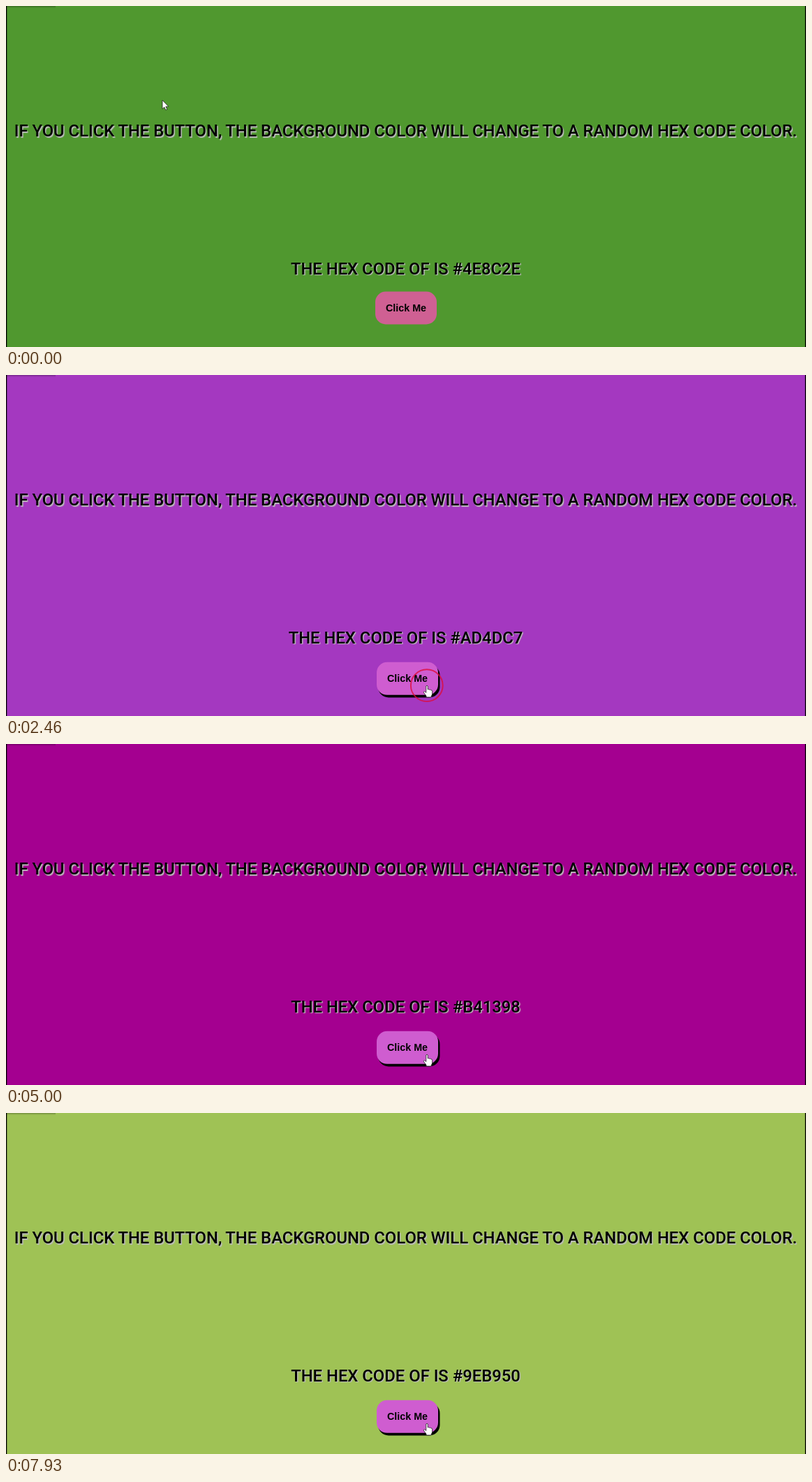
An HTML page that plays this animation: 1146x489 px, repeating every 8000 ms.

```html
<!DOCTYPE html>
<html lang="en">
<head>
<meta charset="utf-8">
<title>Random background color</title>
<style>
html, body { margin: 0; width: 100%; height: 100%; overflow: hidden; }
svg { display: block; width: 100%; height: 100%; }
.line { font: 500 23.8px Roboto, sans-serif; text-anchor: middle; text-shadow: 1.5px 1.5px 1px #bbb; }
.label { font: bold 14.3px "Liberation Sans", sans-serif; text-anchor: middle; }
</style>
</head>
<body>
<svg viewBox="0 0 1146 489">
  <defs>
    <linearGradient id="shade" x1="0" y1="0" x2="0" y2="1">
      <stop offset="0" stop-opacity=".28"/>
      <stop offset="1" stop-opacity="0"/>
    </linearGradient>
  </defs>
  <rect id="page" width="1146" height="489"/>
  <rect width="71" height="3" fill="url(#shade)"/>
  <path d="M.6 0V489M1145.4 0V489" stroke="#000" stroke-width="1.4"/>
  <text class="line" x="572.5" y="187">IF YOU CLICK THE BUTTON, THE BACKGROUND COLOR WILL CHANGE TO A RANDOM HEX CODE COLOR.</text>
  <text class="line" id="code" x="572.5" y="384.5"></text>
  <g id="button">
    <rect id="drop" x="531" y="413.2" width="88.5" height="47" rx="15"/>
    <rect id="face" x="529" y="409.5" width="88" height="47" rx="15"/>
    <text class="label" x="573" y="437.7">Click Me</text>
  </g>
  <circle id="ring" cx="602.8" cy="445.2" fill="none" stroke="#e00b38"/>
  <g id="cursor" stroke="#222" stroke-width=".8" stroke-linejoin="round" fill="#fff">
    <path id="arrow" d="M0 0V12.6L2.8 10L4.8 14.2L6.8 13.3L4.9 9.2H8.8Z"/>
    <path id="hand" d="M-1.2 1Q0-.6 1.2 1V6Q2.6 5 3.4 6.4Q5 5.6 5.8 7Q7.4 6.6 7.6 8.2V12Q7.4 14 6.2 15.5V17H-1V15.3L-4.3 10.8Q-5.3 9-3.5 8.6L-1.2 10.5Z"/>
  </g>
</svg>
<script>
const LOOP = 8000, HOLD = 100, FADE = 370, RADIUS = 25;
const presses = [930, 2330, 3430, 4370, 5370, 6304, 7430];
// start time, shown code, rendered color
const pages = [
  [0, "4E8C2E", "#50982f"],
  [1000, "871CF6", "#7b00ed"],
  [2430, "AD4DC7", "#a438c0"],
  [3530, "B41398", "#a40090"],
  [5470, "E87916", "#de7318"],
  [6404, "80EB2C", "#86ff30"],
  [7530, "9EB950", "#9fc255"]
];
const $ = id => document.getElementById(id);
const set = (id, attrs) => {
  for (const name in attrs) $(id).setAttribute(name, attrs[name]);
};
const clamp = v => Math.min(1, Math.max(0, v));
const ease = v => v * v * (3 - 2 * v);

function drawPage(t) {
  const [, code, color] = pages.findLast(page => t >= page[0]);
  const text = "THE HEX CODE OF IS #" + code;
  set("page", { fill: color });
  if ($("code").textContent !== text) $("code").textContent = text;
}

function drawPointer(t) {
  const p = ease(clamp((t - 60) / 800));
  const x = 224 + 379 * p, y = 135 + 310 * p;
  const over = x > 529 && x < 618 && y > 409;
  set("cursor", { transform: `translate(${x} ${y})` });
  set("arrow", { visibility: over ? "hidden" : "visible" });
  set("hand", { visibility: over ? "visible" : "hidden" });
  set("button", { transform: over ? "translate(2 2.3)" : "" });
  set("drop", { visibility: over ? "visible" : "hidden" });
  set("face", { fill: over ? "#cf5dd0" : "#cf6093" });
}

function drawRing(t) {
  const start = presses.findLast(press => t >= press) ?? -LOOP;
  const left = 1 - clamp((t - start - HOLD) / FADE);
  set("ring", { r: RADIUS * left, opacity: 0.85 * left, "stroke-width": 1 + left });
}

function draw(now) {
  const t = now % LOOP;
  drawPage(t);
  drawPointer(t);
  drawRing(t);
}

const begin = performance.now();
function tick() {
  draw(performance.now() - begin);
  requestAnimationFrame(tick);
}
tick();
</script>
</body>
</html>
```
